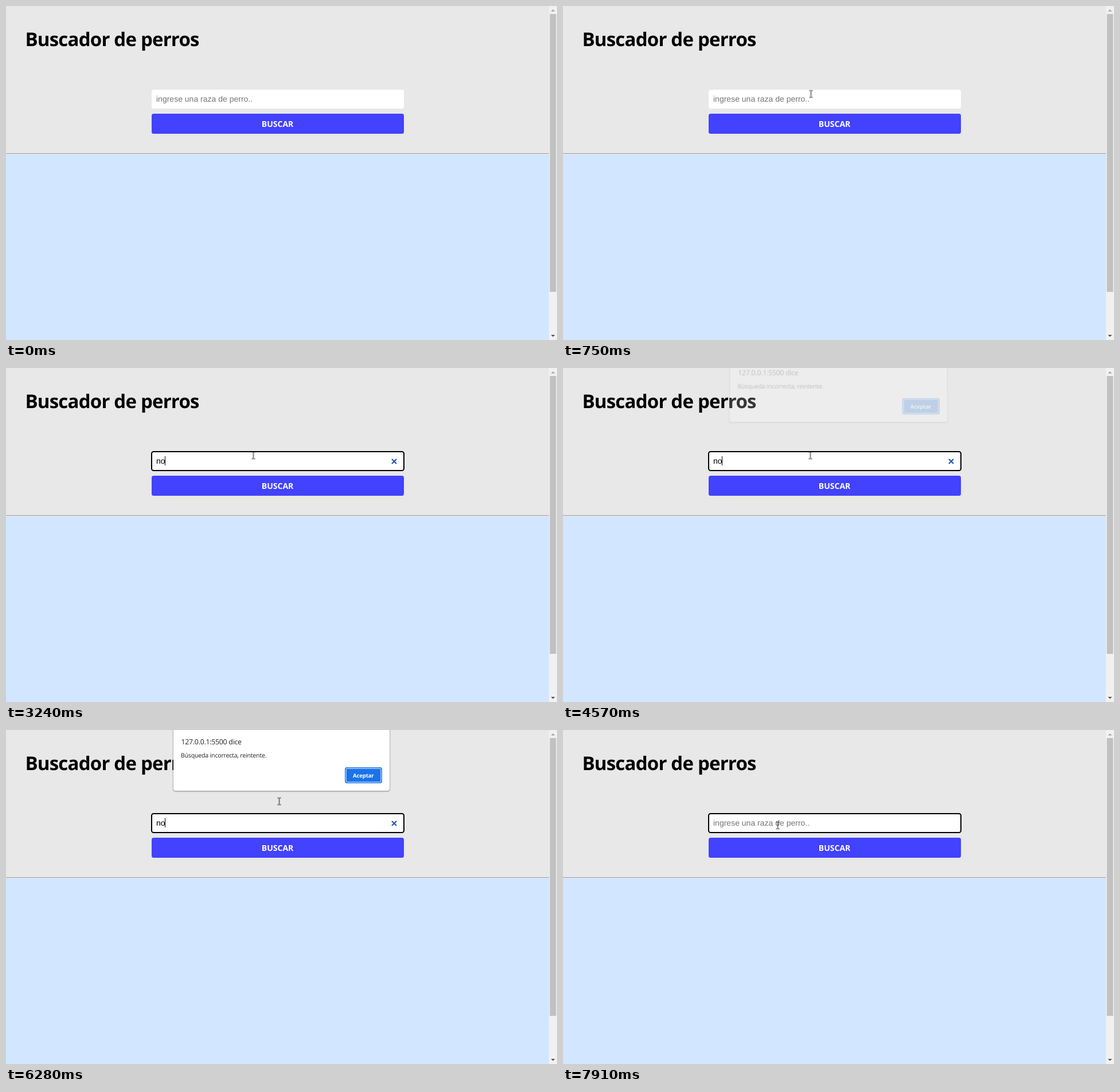
An HTML page for the animation above (7990 ms loop, 961 by 583 pixels).

```html
<!DOCTYPE html>
<html lang="es">
<head>
<meta charset="utf-8">
<title>Buscador de perros</title>
<style>
  html, body { margin: 0; width: 100%; height: 100%; overflow: hidden; }
  #stage { position: fixed; inset: 0; overflow: hidden; background: #e8e8e8; }
  svg { position: absolute; left: 0; top: 0; width: 961px; height: 583px; }
  text { text-rendering: geometricPrecision; }
  .ui { font-family: "Open Sans", "Noto Sans", sans-serif; }
  .field { font: 14px "Liberation Sans", Arial, sans-serif; }
  .bold { font-weight: 700; }
  #dialog {
    position: absolute; left: 292px; top: -10px; width: 376.5px; height: 116px;
    border-radius: 4px; background: #fff; transform-origin: 50% 10px;
    box-shadow: 0 0 1px rgba(0,0,0,.55), 0 1px 3px rgba(0,0,0,.4);
  }
  #dialog svg { top: 10px; width: 376px; height: 106px; }
</style>
</head>
<body>
<div id="stage">
  <svg>
    <rect y="257" width="947" height="1" fill="#9a9a9a"/>
    <rect y="258" width="947" height="1" fill="#eee"/>
    <rect y="259" width="947" height="324" fill="#d2e6ff"/>

    <rect x="947" width="14" height="583" fill="#f1f1f1"/>
    <rect x="948.5" y="14" width="11" height="485" fill="#c1c1c1"/>
    <path d="M950.5 9.5h7l-3.5-3.5z" fill="#a3a3a3"/>
    <path d="M950.5 574h7l-3.5 3.5z" fill="#505050"/>

    <text class="ui bold" x="33.5" y="70" font-size="33" letter-spacing="-.8">Buscador de perros</text>

    <rect x="254" y="146" width="440" height="33" rx="3.5" fill="#fff"/>
    <rect id="ring" x="254" y="146" width="440" height="33" rx="3.5" fill="none" stroke="#000" stroke-width="2"/>
    <g class="field">
      <text id="hint" x="262" y="166.5" fill="#757575">ingrese una raza de perro..</text>
      <text id="typedN" x="262" y="166.5">n</text>
      <text id="typedO" x="269.8" y="166.5">o</text>
    </g>
    <rect id="caret" x="262" y="154" width="1" height="16"/>
    <path id="clear" d="M673 159l8 8m0-8l-8 8" stroke="#2a5db0" stroke-width="2.4"/>

    <rect x="254" y="188" width="440" height="35" rx="3.5" fill="#4242ff"/>
    <text class="ui bold" x="473.6" y="211" font-size="14" text-anchor="middle" fill="#fff">BUSCAR</text>
  </svg>

  <div id="dialog">
    <svg class="ui" fill="#202124">
      <text x="13.5" y="24.5" font-size="12.3" letter-spacing="-.25">127.0.0.1:5500 dice</text>
      <text x="12.8" y="47.8" font-size="10.6" letter-spacing="-.19">Búsqueda incorrecta, reintente.</text>
      <rect x="299" y="65" width="65" height="28" rx="4" fill="#1a73e8"/>
      <rect id="okRing" x="301" y="67" width="61" height="24" rx="2.5" fill="none" stroke="#fff"/>
      <text class="bold" x="331.3" y="82.5" font-size="9.6" letter-spacing="-.15" text-anchor="middle" fill="#fff">Aceptar</text>
    </svg>
  </div>

  <svg>
    <g id="cursor" stroke="#000">
      <path id="arrow" d="M0 0V14.2L3.3 11.2 5.4 16 7.4 15.1 5.3 10.4H9.7Z" fill="#fff"/>
      <path id="beam" d="M-3-6h2.5M.5-6H3M0-5.5v11M-3 6h2.5M.5 6H3" fill="none"/>
    </g>
  </svg>
</div>

<script>
  const LOOP = 7990;
  const FOCUS = 1150, TYPE_N = 3090, TYPE_O = 3240, OPEN = 4570, PRESS = 7130, RESET = 7210;
  const HOLD = "steps(1, end)";

  // Stops are [ms, style, easing to the next stop]; without easing the style holds.
  function track(id, stops) {
    const frames = stops.map(([ms, style, easing = HOLD]) => ({ offset: ms / LOOP, easing, ...style }));
    frames.push({ offset: 1, ...stops[stops.length - 1][1] });
    document.getElementById(id).animate(frames, { duration: LOOP, iterations: Infinity });
  }

  // Shows an element only during the given [from, to] spans.
  function show(id, ...spans) {
    const stops = spans[0][0] ? [[0, { opacity: 0 }]] : [];
    for (const [from, to = LOOP] of spans) {
      stops.push([from, { opacity: 1 }]);
      if (to < LOOP) stops.push([to, { opacity: 0 }]);
    }
    track(id, stops);
  }

  const at = (x, y) => ({ transform: `translate(${x}px, ${y}px)` });

  // The dialog fades and tilts away upwards as lift goes from 0 to 1.
  const pose = lift => ({
    opacity: 1 - lift * lift,
    transform: `translateY(${-14 * lift}px) perspective(1000px) rotateX(${4.8 * lift}deg)`
  });

  show("ring", [FOCUS]);
  show("hint", [0, TYPE_N], [RESET]);
  show("typedN", [TYPE_N, RESET]);
  show("typedO", [TYPE_O, RESET]);
  show("clear", [TYPE_N, RESET]);
  show("caret", [1225, 1770], [2230, 2780], [TYPE_N, 3790], [4270, 7680]);
  track("caret", [[0, at(0, 0)], [TYPE_N, at(8, 0)], [TYPE_O, at(15, 0)], [RESET, at(0, 0)]]);

  track("dialog", [
    [0, pose(1)],
    [OPEN, pose(.89), "linear"], [OPEN + 170, pose(0)],
    [PRESS, pose(0), "linear"], [RESET, pose(.46), "linear"], [RESET + 150, pose(1)]
  ]);
  show("okRing", [0, PRESS]);

  track("cursor", [
    [0, at(896, 537)],
    [290, at(896, 537), "ease-out"], [750, at(432.5, 153.5)], [900, at(431.5, 152.5)],
    [6280, at(476.5, 124.5), "ease-in-out"], [6740, at(626, 68), "ease-in-out"], [7050, at(606, 79)],
    [7370, at(606, 79), "ease-in-out"], [7830, at(384, 182), "ease-out"], [7905, at(374.5, 166.5)]
  ]);
  // The pointer is a text beam over the field and an arrow elsewhere.
  show("arrow", [290, 660], [6465, 7635], [7800, 7850]);
  show("beam", [660, 6465], [7635, 7800], [7850]);
</script>
</body>
</html>
```
